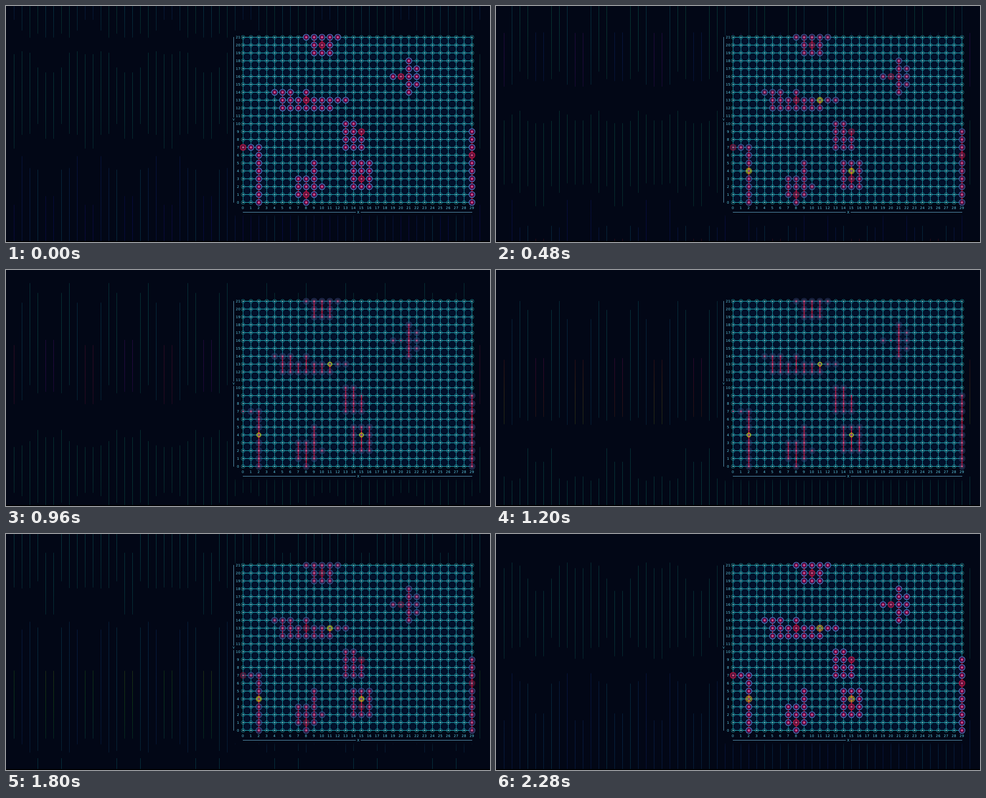
An HTML page with a canvas that plays this animation: 981 px wide and 480 px high, repeating every 2.4 s.

```html
<!DOCTYPE html>
<html lang="en">
<head>
<meta charset="utf-8">
<title>Grid scan</title>
<style>
  html, body { margin: 0; width: 100%; height: 100%; overflow: hidden; background: #020716; }
  canvas, svg { position: absolute; left: 0; top: 0; width: 981px; height: 480px; }
  text { font: 7px "DejaVu Sans", sans-serif; letter-spacing: .3px; fill: #62cfe8; text-anchor: middle; }
  .row { stroke: #24bcc6; }
  .col { stroke: #189fac; }
  .axis { stroke: #5e9fbd; }
  .node { fill: none; stroke: #25b3ba; stroke-opacity: .75; }
  .dot { stroke: #8feaea; }
  .run { stroke: #f01238; stroke-width: 1.6; }
  .halo { fill: #0a0c34; fill-opacity: .85; stroke: #7590ee; stroke-width: 1.1; }
  .seed { fill: #960f55; fill-opacity: .85; }
  .core { stroke: #ff8cc4; }
  .head { fill: #780a38; fill-opacity: .8; stroke: #d8164a; stroke-width: 1.1; }
  .mark { fill: none; stroke: #f7ea18; stroke-width: 1.2; }
</style>
</head>
<body>
<canvas id="rain" width="981" height="480"></canvas>
<svg id="grid" viewBox="0 0 981 480"></svg>
<script>
const STEP = 120, STEPS = 20, COLS = 30, ROWS = 22, GAP = 16;
const gx = i => 480.5 + i * GAP;
const gy = j => 399.5 - j * GAP;
const svg = document.getElementById('grid');
const ctx = document.getElementById('rain').getContext('2d');

function add(tag, cls, attrs, parent = svg) {
  const el = document.createElementNS('http://www.w3.org/2000/svg', tag);
  if (cls) el.setAttribute('class', cls);
  for (const k in attrs) el.setAttribute(k, attrs[k]);
  parent.append(el);
  return el;
}
const line = (cls, x1, y1, x2, y2) => add('line', cls, { x1, y1, x2, y2 });
const circle = (cls, i, j, r, parent) => add('circle', cls, { cx: gx(i), cy: gy(j), r }, parent);
const label = (s, x, y) => { add('text', '', { x, y }).textContent = s; };
const cross = (cls, i, j, r) =>
  add('path', cls, { d: `M${gx(i) - r} ${gy(j)}h${2 * r}M${gx(i)} ${gy(j) - r}v${2 * r}` });

// Occupied cells as column:first-last row
const runs = ('8:21 9:19-21 10:19-21 11:19-21 12:21 19:16 20:16 21:14-18 22:15-17 ' +
  '4:14 5:12-14 6:12-14 7:12-13 8:12-14 9:12-13 10:12-13 11:12-13 12:13 13:13 ' +
  '13:7-10 14:7-10 15:7-9 29:0-9 0:7 1:7 2:0-7 7:1-3 8:0-3 9:1-5 10:2 ' +
  '14:2-5 15:2-5 16:2-5').split(' ').map(r => {
    const [x, a, b = a] = r.split(/[:-]/).map(Number);
    return { x, a, b };
  });
const heads = ['0,7', '8,1', '8,13', '10,20', '15,9', '15,3', '20,16', '29,6'];
const marks = ['11,13', '2,4', '15,4'];

add('rect', '', { x: 480, y: 63, width: 465, height: 337, fill: '#02102a' });
for (let i = 0; i < COLS; i++) line('col', gx(i), gy(ROWS - 1), gx(i), gy(0));
for (let j = 0; j < ROWS; j++) line('row', gx(0), gy(j), gx(COLS - 1), gy(j));
for (let i = 0; i < COLS; i++) {
  for (let j = 0; j < ROWS; j++) {
    circle('node', i, j, 3.7);
    cross('dot', i, j, 1.5);
  }
}

for (const { x, a, b } of runs) {
  if (b > a && x !== 22) line('run', gx(x), gy(a), gx(x), gy(b));
}
const halos = add('g'), markHalos = add('g'), reds = add('g');
for (const { x, a, b } of runs) {
  for (let y = a; y <= b; y++) {
    const key = x + ',' + y;
    if (heads.includes(key)) {
      circle('head', x, y, 6, reds);
    } else {
      const group = marks.includes(key) ? markHalos : halos;
      circle('halo', x, y, 6, group);
      circle('seed', x, y, 4.2, group);
    }
    cross('core', x, y, 1.8);
  }
}
const gold = add('g');
const goldRings = marks.map(key => {
  const [x, y] = key.split(',');
  circle('mark', x, y, 3.6, gold);
  return circle('mark', x, y, 6, gold);
});

for (let i = 0; i < COLS; i++) label(i, gx(i) - .3, 413.4);
for (let j = 0; j < ROWS; j++) label(j, 470.5, gy(j) + 2.6);
line('axis', 461.5, 63, 461.5, 227);
line('axis', 461.5, 236, 461.5, 400);
line('axis', 480, 419.5, 709, 419.5);
line('axis', 719, 419.5, 945, 419.5);
label('Y', 461.5, 234);
label('X', 714, 422);

// Streak passes: tops, bottoms and hues at shared key steps
const firstKeys = [-2, 6, 13, 22], secondKeys = [12, 20, 26, 32];
const secondHues = [180, 170, 160, 175];
const kinds = [
  { first: [[-150, 123, 227, 455], [-40, 232, 375, 560]], hue: [180, 310, 410, 660],
    second: [[-130, 98, 300, 480], [0, 290, 400, 560]] },
  { first: [[-200, 33, 150, 350], [-5, 215, 390, 560]], hue: [190, 185, 210, 230],
    second: [[-180, 92, 285, 500], [20, 262, 410, 560]] },
  { first: [[-220, -10, 118, 390], [30, 168, 400, 600]], hue: [170, 165, 200, 220],
    second: [[-150, 95, 272, 500], [20, 260, 440, 600]] },
  { first: [[-200, 12, 133, 390], [10, 195, 390, 620]], hue: [165, 160, 190, 195],
    second: [[-150, 125, 288, 400], [10, 240, 430, 560]] },
  { first: [[-100, 105, 235, 430], [20, 197, 375, 560]], hue: [170, 240, 380, 660],
    second: [[-20, 135, 290, 440], [100, 270, 476, 580]] }
];

function at(keys, values, s) {
  let k = 0;
  while (k < keys.length - 2 && s > keys[k + 1]) k++;
  return values[k] + (values[k + 1] - values[k]) * (s - keys[k]) / (keys[k + 1] - keys[k]);
}

function streak(x, top, bottom, hue, turn) {
  const g = ctx.createLinearGradient(0, top, 0, bottom);
  const tone = (h, a) => `hsla(${h % 360}, 80%, 36%, ${a})`;
  g.addColorStop(0, tone(hue, .3));
  g.addColorStop(.5, tone(hue + turn / 2, .34));
  g.addColorStop(1, tone(hue + turn, .26));
  ctx.fillStyle = g;
  ctx.fillRect(x, top, 1, bottom - top);
}

function pass(x, keys, [tops, bottoms], hues, step) {
  for (const s of [step, step + STEPS]) {
    if (s > keys[3] + 3) continue;
    const turn = hues[3] > 360 && s > 8 && s < 17 ? 60 : 0;
    streak(x, at(keys, tops, s), at(keys, bottoms, s), at(keys, hues, s), turn);
  }
}

function drawRain(step) {
  ctx.fillStyle = '#020716';
  ctx.fillRect(0, 0, 981, 480);
  for (let k = 0; k < 60; k++) {
    const m = k % 10, kind = kinds[Math.min(m, 9 - m)], x = 16 + k * GAP;
    pass(x, firstKeys, kind.first, kind.hue, step);
    if (step >= secondKeys[0]) pass(x, secondKeys, kind.second, secondHues, step);
    else pass(x, secondKeys.map(s => s - STEPS), kind.second, secondHues, step);
  }
  ctx.save();
  ctx.shadowColor = ctx.fillStyle = '#020716';
  ctx.shadowBlur = 12;
  ctx.fillRect(457, 60, 495, 366);
  ctx.restore();
  ctx.fillStyle = '#000';
  ctx.fillRect(0, 478, 981, 2);
}

function draw(step) {
  const wave = Math.cos(step / STEPS * 2 * Math.PI), glow = (1 + wave) / 2;
  drawRain(step);
  halos.setAttribute('opacity', .65 + .33 * wave);
  markHalos.setAttribute('opacity', step ? 0 : 1);
  reds.setAttribute('opacity', glow);
  gold.setAttribute('opacity', step ? 1 : 0);
  for (const ring of goldRings) {
    ring.setAttribute('opacity', .15 + .85 * glow);
    ring.setAttribute('r', 5 + 1.2 * glow);
    ring.style.stroke = step > 16 ? '#f2a52a' : '';
  }
}

let shown = -1;
const start = performance.now();
function tick() {
  const step = Math.floor((performance.now() - start) / STEP) % STEPS;
  if (step !== shown) draw(shown = step);
  requestAnimationFrame(tick);
}
tick();
</script>
</body>
</html>
```
